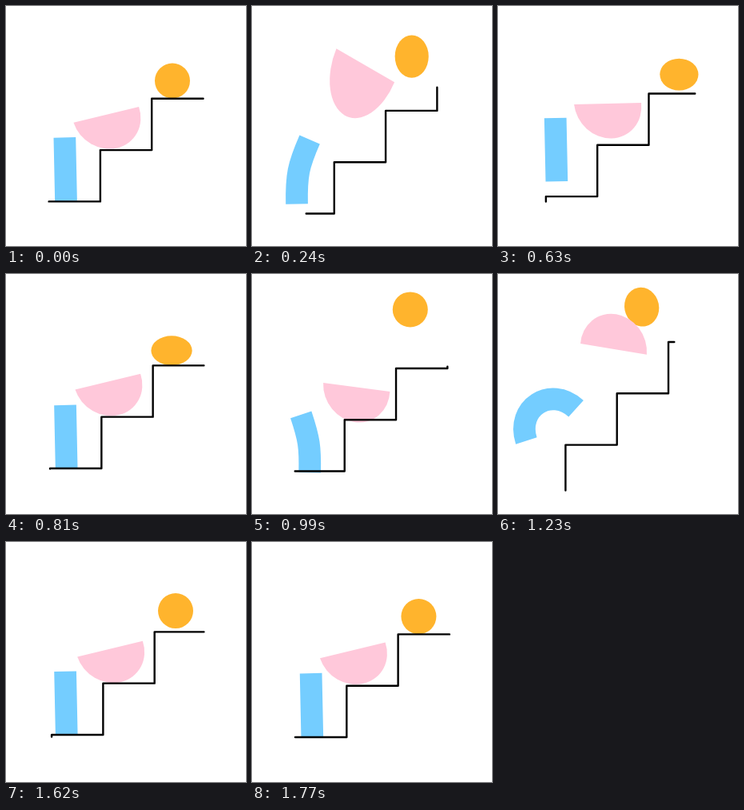
These frames come from a looping animation (300x300 px, 1800 ms). An HTML page with a canvas:

```html
<!DOCTYPE html>
<html lang="en">
<head>
<meta charset="utf-8">
<title>Climbing shapes</title>
<style>
html, body { margin: 0; width: 100%; height: 100%; overflow: hidden; background: #fff; }
canvas { display: block; width: 100vmin; height: 100vmin; }
</style>
</head>
<body>
<canvas id="stage"></canvas>
<script>
const canvas = document.getElementById('stage');
const ctx = canvas.getContext('2d');
const SIZE = 300, LOOP = 1800, CYCLE = 900, STEP = 64.3;

const rad = deg => deg * Math.PI / 180;
const clamp = v => Math.min(1, Math.max(0, v));
const ramp = (t, a, b) => clamp((t - a) / (b - a || 1));
const smooth = (t, a, b) => { const u = ramp(t, a, b); return u * u * (3 - 2 * u); };
const bump = (t, a, peak, b) => smooth(t, a, peak) - smooth(t, peak, b);

// Bezier easing with flat ends
function ease(p, x1 = 0.49, x2 = 0.108) {
  let lo = 0, hi = 1;
  for (let k = 0; k < 30; k++) {
    const m = (lo + hi) / 2, w = 1 - m;
    const x = 3 * x1 * m * w * w + 3 * x2 * m * m * w + m * m * m;
    if (x < p) lo = m; else hi = m;
  }
  return lo * lo * (3 - 2 * lo);
}

// How far the stairs have scrolled, in steps
function scroll(t) {
  const p = (t % CYCLE) / CYCLE;
  return Math.floor(t / CYCLE) + 0.81 * ease(p) + 0.19 * p;
}

// Smooth closed path through [time, x, y] points, without overshoot
function path(points) {
  const n = points.length;
  const at = (i, c) => {
    const turn = Math.floor(i / n);
    return points[i - turn * n][c] + (c ? 0 : turn * CYCLE);
  };
  const slope = (i, c) => (at(i + 1, c) - at(i, c)) / (at(i + 1, 0) - at(i, 0));
  const tangent = (i, c) => {
    const a = slope(i - 1, c), b = slope(i, c);
    return a * b <= 0 ? 0 : 2 * a * b / (a + b);
  };
  return t => {
    let i = n - 1;
    while (at(i, 0) > t) i--;
    const span = at(i + 1, 0) - at(i, 0);
    const u = (t - at(i, 0)) / span, v = 1 - u;
    return [1, 2].map(c =>
      v * v * (1 + 2 * u) * at(i, c) + u * u * (3 - 2 * u) * at(i + 1, c)
      + span * u * v * (v * tangent(i, c) - u * tangent(i + 1, c)));
  };
}

const bowlPath = path([
  [0, 129.6, 153.9], [170, 127.7, 163.8], [240, 127.5, 99.2],
  [330, 147.5, 75.6], [570, 139.8, 126.3], [700, 135, 151]
]);
const slabPath = path([
  [0, 74.2, 204], [160, 62, 217], [330, 66.5, 188.5],
  [400, 57, 176], [570, 64.3, 171.3], [630, 72.5, 179.5], [740, 75, 203]
]);

// from and to are distances from the edge of the step
const hops = [
  { start: 175, end: 640, height: 65, from: 26, to: 40, climb: 1, lean: 0 },
  { start: 840, end: 1110, height: 52, from: 22.6, to: 13, climb: 0, lean: 0 },
  { start: 1110, end: 1500, height: 74, from: 13, to: 27, climb: 1, lean: -14 },
  { start: 1540, end: 1690, height: 4, from: 27, to: 26, climb: 0, lean: 0 }
];

function drawBall(t) {
  let x = 26, level = 0, lift = 0, stretch = 0, squash = 0, lean = 0;
  let floor = 0, rested = 0;
  for (const hop of hops) {
    const u = ramp(t, hop.start, hop.end);
    x += (floor * STEP + hop.from - x) * smooth(t, rested, hop.start);
    floor += hop.climb;
    x += (floor * STEP + hop.to - x) * u ** 1.25;
    level += hop.climb * u;
    lift += 4 * hop.height * u * (1 - u);
    lean += hop.lean * Math.sin(Math.PI * u);
    if (hop.height > 10) {
      stretch += 0.3 * Math.max(0, 1 - 2 * u) * Math.min(1, 10 * u);
      for (const hit of [hop.start - 20, hop.end + 15])
        squash = Math.max(squash, 0.18 * Math.exp(-(((t - hit) / 30) ** 2)));
    }
    rested = hop.end;
  }
  const shift = scroll(t) * STEP;
  const rx = 22 * (1 + squash - 0.2 * stretch);
  const ry = 22 * (1 - squash + stretch);
  ctx.fillStyle = '#ffb42d';
  ctx.beginPath();
  ctx.ellipse(182 + x - shift, 115.5 - level * STEP + shift - lift - ry, rx, ry, rad(lean), 0, 7);
  ctx.fill();
}

function drawBowl(t) {
  const angle = -13.6 + 360 * smooth(t, 215, 455)
    + 32 * (smooth(t, 0, 150) - smooth(t, 550, 690));
  const depth = 43.5 + 23.5 * bump(t, 170, 240, 330) - 6 * bump(t, 100, 165, 210);
  ctx.save();
  ctx.translate(...bowlPath(t));
  ctx.rotate(rad(angle));
  ctx.translate(0, -0.424 * depth);
  ctx.transform(1, 0, 0.002 * depth, 1, 0, 0);
  ctx.fillStyle = '#ffc8da';
  ctx.beginPath();
  ctx.ellipse(0, 0, 42, depth, 0, 0, Math.PI);
  ctx.fill();
  ctx.restore();
}

function drawSlab(t) {
  const crouch = bump(t, 20, 150, 215);
  const whip = bump(t, 210, 330, 620);
  const angle = -91.2 + 180 * smooth(t, 175, 585) - 13 * crouch;
  const half = rad(150 * whip - 35 * crouch) / 2;
  const length = 79.3 + 21 * whip - 10 * crouch;
  const chord = Math.abs(half) < 0.001 ? length : length * Math.sin(half) / half;
  const hx = 0.43 * length * Math.cos(half), hy = -0.43 * length * Math.sin(half);
  const sag = (half ? chord / 2 : 0) && 0;
  ctx.save();
  ctx.translate(...slabPath(t));
  ctx.rotate(rad(angle));
  ctx.strokeStyle = '#74cdff';
  ctx.lineWidth = 27.7;
  ctx.lineCap = 'butt';
  ctx.beginPath();
  ctx.moveTo(-chord / 2, sag);
  ctx.bezierCurveTo(-chord / 2 + hx, hy, chord / 2 - hx, hy, chord / 2, sag);
  ctx.stroke();
  ctx.restore();
}

function drawStairs(t) {
  const shift = (scroll(t) % 1) * STEP;
  const from = 2 * ease((t % CYCLE) / CYCLE), to = from + 5;
  // s counts treads and risers along the stairs
  const point = s => {
    const k = Math.floor(s), f = s - k;
    const across = Math.ceil(k / 2) + (k % 2 ? 0 : f);
    const up = Math.floor(k / 2) + (k % 2 ? f : 0);
    return [53.6 - shift + across * STEP, 244.4 + shift - up * STEP];
  };
  ctx.strokeStyle = '#000';
  ctx.lineWidth = 2.4;
  ctx.lineCap = ctx.lineJoin = 'round';
  ctx.beginPath();
  ctx.moveTo(...point(from));
  for (let k = Math.floor(from) + 1; k < to; k++) ctx.lineTo(...point(k));
  ctx.lineTo(...point(to));
  ctx.stroke();
}

function resize() {
  const side = Math.min(innerWidth, innerHeight) || SIZE;
  canvas.width = canvas.height = Math.round(side * (devicePixelRatio || 1));
}

const start = performance.now();
function frame(now) {
  const t = Math.max(0, now - start) % LOOP;
  const scale = canvas.width / SIZE;
  ctx.setTransform(scale, 0, 0, scale, 0, 0);
  ctx.fillStyle = '#fff';
  ctx.fillRect(0, 0, SIZE, SIZE);
  drawBall(t);
  drawBowl(t % CYCLE);
  drawSlab(t % CYCLE);
  drawStairs(t);
  requestAnimationFrame(frame);
}

addEventListener('resize', resize);
resize();
frame(start);
</script>
</body>
</html>
```
